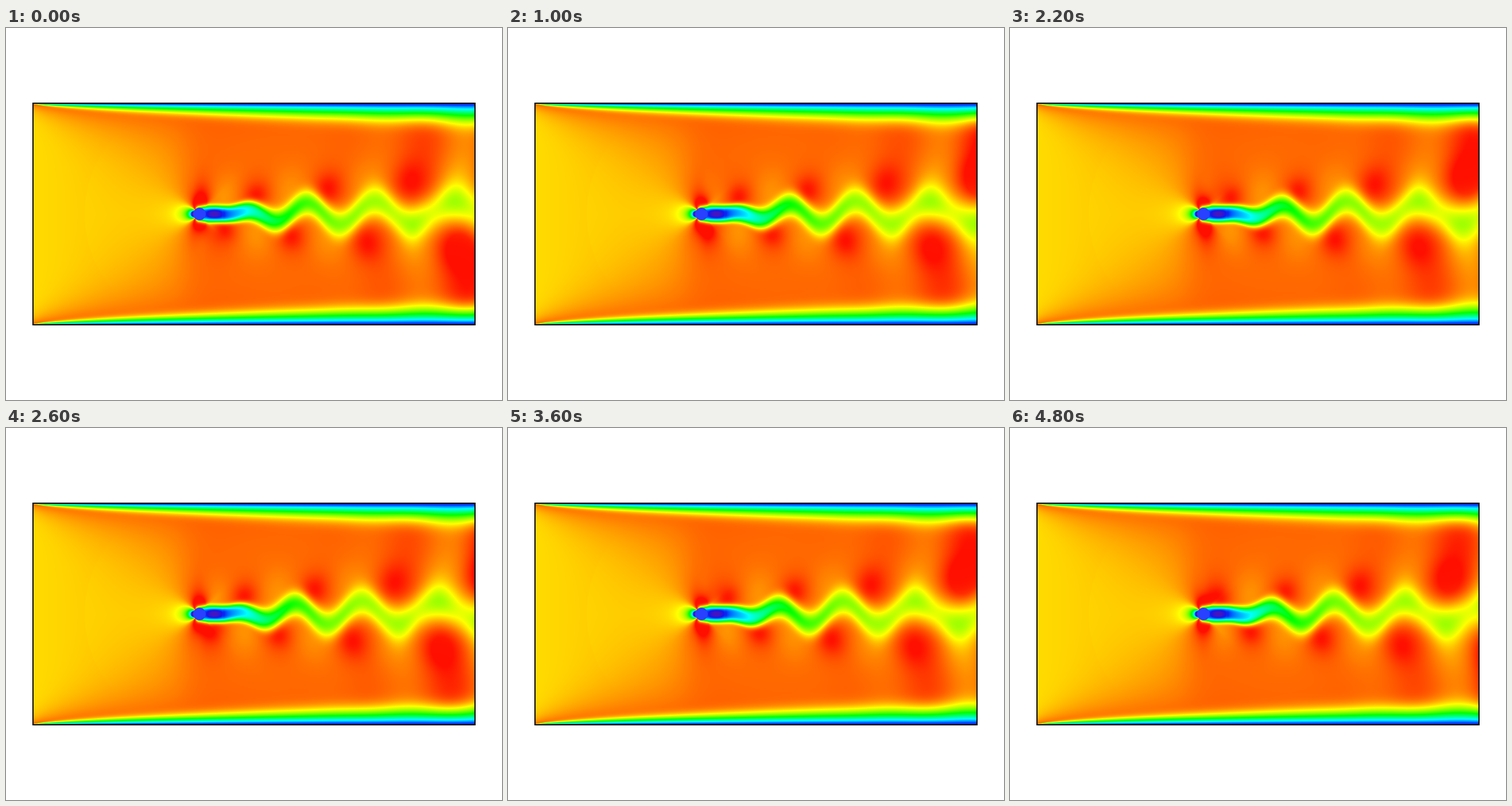
An HTML page with a canvas for the animation above (5 s loop, 864 px wide and 648 px high).

```html
<!DOCTYPE html>
<html>
<head>
<meta charset="utf-8">
<style>
html, body { margin: 0; width: 100%; height: 100%; overflow: hidden; background: #fff; }
canvas { display: block; }
</style>
</head>
<body>
<canvas id="stage" width="864" height="648"></canvas>
<script>
const ctx = document.getElementById('stage').getContext('2d');
const LEFT = 48, TOP = 132, W = 768, H = 384, MID = 324, CYL = 337;
const STEP = 200, STEPS = 25, PERIOD = 7.15;   // shedding period in steps
const TAU = Math.PI * 2;
const { exp, cos, tanh, abs, min, max, sqrt } = Math;

const smooth = (a, b, x) => {
  const k = min(1, max(0, (x - a) / (b - a)));
  return k * k * (3 - 2 * k);
};
const bell = x => exp(-x * x);

// Speed to colour: violet, blue, cyan, green, yellow, red
const stops = [
  [0, 70, 20, 190], [.05, 20, 20, 235], [.1, 0, 90, 255], [.25, 0, 255, 255],
  [.5, 0, 255, 0], [.75, 255, 255, 0], [1, 255, 0, 0]
];
const palette = Array.from({ length: 1025 }, (_, n) => {
  const v = n / 1024;
  const i = max(1, stops.findIndex(s => s[0] >= v));
  const a = stops[i - 1], b = stops[i], k = (v - a[0]) / (b[0] - a[0]);
  return [1, 2, 3].map(c => a[c] + (b[c] - a[c]) * k);
});

// Everything that depends on x and the shedding phase
function column(x, phase) {
  const u = x - 47;
  const s = (sqrt(max(0, 13456 + 34.8 * (x - 436))) - 116) / 17.4;
  const theta = s - phase;
  const lag = max(.015, .28 - .00102 * (x - 460));
  const start = smooth(322, 350, x);
  const wave = cos(TAU * theta);
  const far = cos(TAU * (theta - .1));
  const grow = .08 * max(0, (x - 450) / 350) ** 3;
  const sides = [1, -1].map(sign => ({
    lobe: .035 * start * sign * wave,
    spot: (.055 - .02 * smooth(560, 720, x)) * start * exp(1.8 * (sign * wave - 1)),
    wide: grow * (.3 + .7 * sign * far)
  }));
  const swing = theta - lag;
  return {
    sides,
    core: .785 + .03 * min(1, u / 230) + .07 / (1 + exp((312 - x) / 16)),
    layer: max(.5, 35 * (u / 770) ** .65),
    reach: 10 + .25 * u,
    off: max(27, 32 + .088 * (x - 436)),
    size: 20 + .05 * max(0, x - 436),
    wake: smooth(328, 336, x),
    centre: MID - 2 * smooth(400, 600, x)
      + 20 * (1 - bell(max(0, x - 360) / 110)) * cos(TAU * swing),
    width: 11.5 + 2.5 * smooth(330, 355, x) + .05 * max(0, x - 390),
    power: 3.4 - 1.4 * smooth(380, 480, x),
    slow: .06 * min(1, ((x - 363) / 14) ** 2) * (1 - smooth(380, 420, x))
      + .7 * (1 - exp(-max(0, x - 380) / 90))
      - .035 * smooth(600, 760, x) * cos(2 * TAU * swing)
  };
}

function speed(x, y, c) {
  const dy = y - MID, dist = abs(dy), dx = x - CYL;
  const side = c.sides[dy < 0 ? 0 : 1];
  const wall = min(y - 131.5, 516.5 - y);
  const layer = c.layer * (1 - .8 * side.wide);

  let v = c.core + max(0, .905 - c.core) * exp(-max(0, wall - layer) / c.reach);

  // Flow parting around the cylinder
  const r2 = max(121, dx * dx + dy * dy);
  if (r2 < 40000) {
    const d = 190 * (dy * dy - dx * dx) / (r2 * r2);
    v *= 1 + (d > 0 ? .6 * d : dx < 0 ? max(-1, d) : 0);
  }

  // Fast patches between the vortices
  if (x > 322) {
    const gap = dist - c.off;
    v += side.lobe * tanh(dist / 12) * bell(gap / 40)
      + side.spot * bell(gap / c.size)
      + side.wide * tanh(dist / 40);
  }
  v = min(.985, v);

  // Swinging wake
  if (c.wake) {
    const r = abs(y - c.centre) / c.width;
    if (r < 3) v += (c.slow - v) * c.wake * exp(-(r ** c.power));
  }

  // Slow layer along the walls
  const q = wall / layer;
  if (q < 3) v = max(.07, v * tanh(1.05 * q + .15 * q ** 3));
  return min(.985, max(0, v));
}

function render(step) {
  const img = ctx.createImageData(W, H), px = img.data;
  for (let i = 0; i < W; i++) {
    const x = LEFT + i + .5, c = column(x, step / PERIOD);
    for (let j = 0; j < H; j++) {
      const rgb = palette[Math.round(speed(x, TOP + j + .5, c) * 1024)];
      const p = (j * W + i) * 4;
      px[p] = rgb[0];
      px[p + 1] = rgb[1];
      px[p + 2] = rgb[2];
      px[p + 3] = 255;
    }
  }
  return img;
}

const cache = [];
let shown = -1;

function draw() {
  const step = Math.floor(performance.now() % (STEP * STEPS) / STEP);
  if (step !== shown) {
    shown = step;
    cache[step] = cache[step] || render(step);
    ctx.fillStyle = '#fff';
    ctx.fillRect(0, 0, 864, 648);
    ctx.putImageData(cache[step], LEFT, TOP);
    ctx.fillStyle = '#2840ff';
    ctx.beginPath();
    ctx.arc(CYL, MID, 11, 0, TAU);
    ctx.fill();
    ctx.strokeStyle = '#000';
    ctx.lineWidth = 2;
    ctx.strokeRect(47, 131, 770, 386);
  }
  requestAnimationFrame(draw);
}
draw();
</script>
</body>
</html>
```
